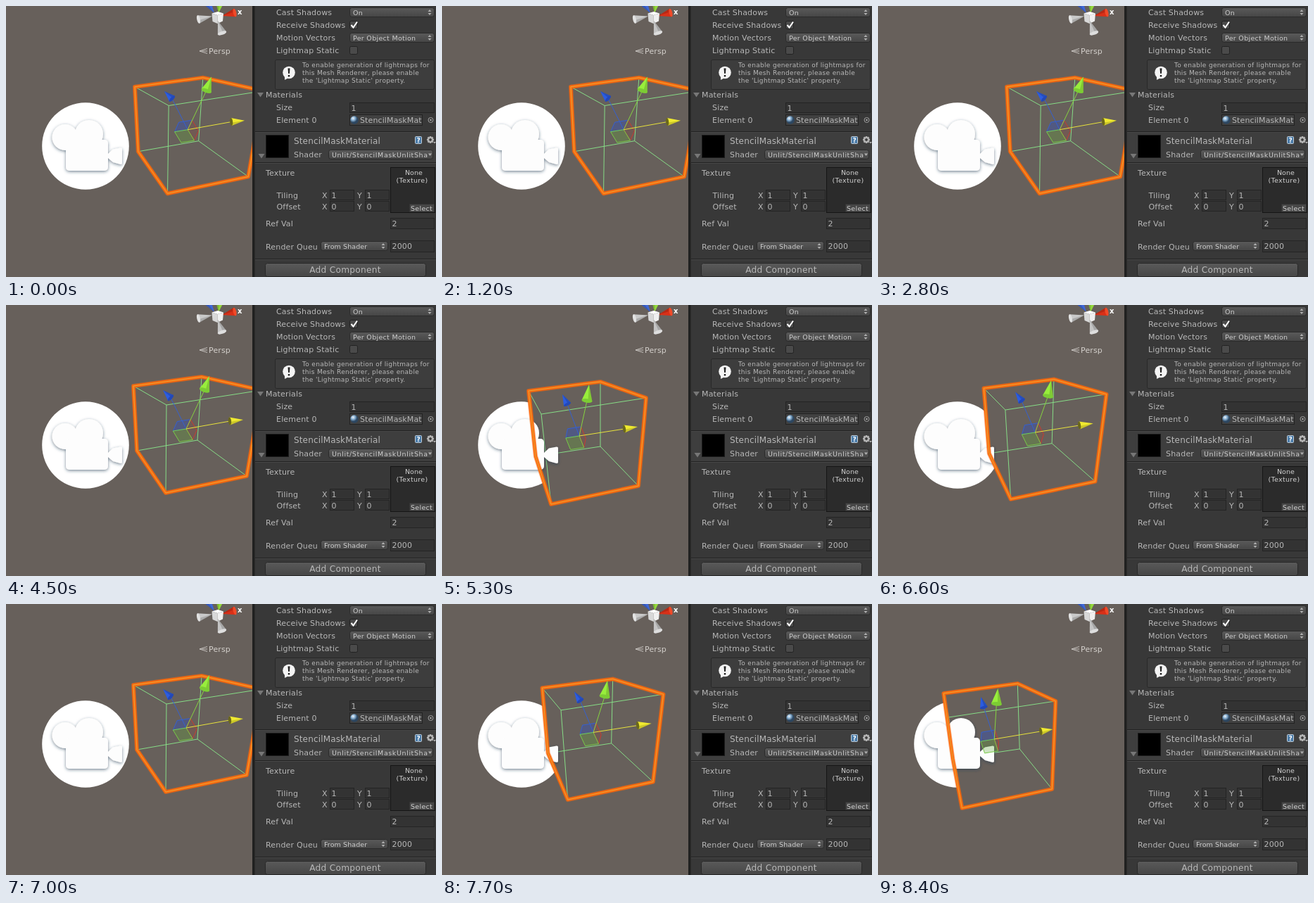
Recreate the animation shown at these times as an HTML page. Size 611 by 385 pixels, loop 9.6 s.

```html
<!DOCTYPE html>
<html lang="en">
<head>
<meta charset="utf-8">
<title>Stencil mask</title>
<style>
html, body { margin: 0; width: 100%; height: 100%; overflow: hidden; background: #67605b; }
svg { display: block; width: 611px; height: 385px; }
text { font-family: "DejaVu Sans", sans-serif; white-space: pre; }
</style>
</head>
<body>
<svg viewBox="0 0 611 385" xmlns="http://www.w3.org/2000/svg">
  <defs>
    <clipPath id="view"><path d="M0 0H350V385H0Z"/></clipPath>
    <clipPath id="slot"><path d="M488 154H591V171H488Z"/></clipPath>
    <linearGradient id="btn" x2="0" y2="1"><stop stop-color="#5a5a5a"/><stop offset="1" stop-color="#464646"/></linearGradient>
    <radialGradient id="ball" cx=".35" cy=".3"><stop stop-color="#f0f6fb"/><stop offset=".5" stop-color="#86aed0"/><stop offset="1" stop-color="#2c4660"/></radialGradient>
    <filter id="soft" x="-20%" y="-20%" width="140%" height="140%"><feDropShadow dx="0" dy="1.5" stdDeviation="2" flood-color="#243850" flood-opacity=".6"/></filter>
  </defs>
  <rect width="350" height="385" fill="#67605b"/>
  <g clip-path="url(#view)">
    <circle cx="113" cy="199" r="61.8" fill="#fff"/>
    <path id="mask" fill="#67605b"/>
    <path id="wires" fill="none" stroke="#86dc86"/>
    <g filter="url(#soft)" fill="#fdfdfd">
      <circle cx="84" cy="186.500" r="18.500"/>
      <circle cx="118" cy="182" r="20"/>
      <rect x="85" y="190" width="60" height="44" rx="5"/>
      <path d="M144 211L152 203.500L163 201.500Q165 201.500 165 203V223Q165 225 163 225L152 222L144 215Z"/>
    </g>
    <g fill="none" stroke-linejoin="round">
      <path id="halo" stroke="#f2660c" stroke-opacity=".55" stroke-width="6.200"/>
      <path id="glow" stroke="#ff6a0c" stroke-width="4.200"/>
      <path id="edge" stroke="#c8d860" stroke-opacity=".6" stroke-width=".9"/>
    </g>
    <g id="handles"></g>
    <g id="compass"></g>
  </g>
  <g id="panel"></g>
</svg>
<script>
const $ = id => document.getElementById(id);

// Each point: x, y in three poses, taken where the cube's left corner is at LEAD.
const LEAD = [181, 123, 93];
const POINTS = {
  a: [181, 115, 123, 122, 93, 127],
  b: [278, 102, 225, 109, 198, 113],
  c: [363, 121, 290, 132, 252, 138],
  d: [228, 142, 141, 155, 100, 161],
  e: [342, 243, 279, 257, 247, 263],
  f: [227, 267, 155, 283, 119, 290],
  g: [272, 192, 225, 201, 201, 206],
  h: [186, 207, 133, 215, 106, 220],
  o: [256, 176, 195, 186, 165, 192],
  xTip: [337, 163, 278, 173, 248, 178],
  xBase: [318, 165, 259, 176, 231, 181],
  yTip: [289, 101, 209, 113, 170, 120],
  yBase: [282, 121, 206, 136, 168, 142],
  zTip: [223, 121, 171, 127, 146, 132],
  zBase: [234, 132, 178, 141, 150, 147]
};

function pose(x) {
  const w = LEAD.map((p, i) => LEAD.reduce((m, q, j) => i === j ? m : m * (x - q) / (p - q), 1));
  const out = {};
  for (const k in POINTS) {
    const p = POINTS[k];
    out[k] = [0, 1].map(c => w[0] * p[c] + w[1] * p[c + 2] + w[2] * p[c + 4]);
  }
  return out;
}

const PUSH = [[4400, 183], [4500, 181], [4700, 170.5], [5300, 123], [5400, 113], [5500, 105.5], [5600, 99.5], [5700, 95], [5800, 92.5]];
const ease = (t, t0, t1, from, to) => {
  const u = Math.min(1, Math.max(0, (t - t0) / (t1 - t0)));
  return from + (to - from) * (1 - Math.cos(Math.PI * u)) / 2;
};

function lead(t) {
  if (t < 4400) return 183;
  if (t < 5800) {
    const i = PUSH.findIndex(k => k[0] > t);
    const [t0, x0] = PUSH[i - 1], [t1, x1] = PUSH[i];
    return x0 + (x1 - x0) * (t - t0) / (t1 - t0);
  }
  return t < 7100 ? ease(t, 6000, 7000, 92.5, 181) : ease(t, 7100, 8400, 181, 93.3);
}

const path = (...pts) => "M" + pts.map(p => p.map(v => v.toFixed(2)).join(" ")).join("L");

function cone(base, tip, r, fill, disc) {
  const dx = tip[0] - base[0], dy = tip[1] - base[1];
  const len = Math.hypot(dx, dy), turn = Math.atan2(dy, dx) * 180 / Math.PI;
  return `<g transform="translate(${base}) rotate(${turn})"><path d="M0 ${-r}L${len} 0L0 ${r}Z" fill="${fill}"/>` +
    `<path d="M0 ${r * .2}L${len} 0L0 ${r}Z" fill="#000" opacity=".15"/>` +
    `<ellipse rx="${r * .38}" ry="${r}" fill="${disc}"/></g>`;
}

function handles(p) {
  const off = (tip, k) => [0, 1].map(i => (tip[i] - p.o[i]) * k);
  const add = (...v) => [0, 1].map(i => v.reduce((s, q) => s + q[i], 0));
  const x = off(p.xTip, -.23), y = off(p.yTip, .18), z = off(p.zTip, -.28);
  const quad = (u, v, stroke, fill) =>
    `<path d="${path(p.o, add(p.o, u), add(p.o, u, v), add(p.o, v))}Z" stroke="${stroke}" fill="${fill}"/>`;
  const axis = (end, color) => `<path d="${path(p.o, end)}" stroke="${color}"/>`;
  return quad(x, y, "#3560d0", "rgba(50,80,190,.4)") +
    quad(y, z, "#cc3a30", "rgba(190,50,40,.12)") +
    quad(x, z, "#78cc48", "rgba(100,170,60,.3)") +
    axis(p.zBase, "#3560d0") + axis(p.yBase, "#86d440") + axis(p.xBase, "#e8e23c") +
    cone(p.zBase, p.zTip, 5.5, "#2c5ce0", "#2348b8") +
    cone(p.yBase, p.yTip, 7.5, "#98ee3c", "#7ccc34") +
    cone(p.xBase, p.xTip, 5.5, "#f0ea30", "#6b681c");
}

function draw(t) {
  const p = pose(lead(t)), { a, b, c, d, e, f, g, h } = p;
  const hull = path(a, b, c, e, f, h) + "Z";
  for (const id of ["mask", "halo", "glow", "edge"]) $(id).setAttribute("d", hull);
  $("wires").setAttribute("d", path(a, d, c) + path(d, f) + path(b, g, h) + path(g, e));
  $("handles").innerHTML = handles(p);
}

// Inspector panel
const text = (x, y, s, size = 11, gap = .18, more = "") =>
  `<text x="${x}" y="${y}" font-size="${size}" letter-spacing="${gap}" fill="#b8b8b8" ${more}>${s}</text>`;
const small = (x, y, s, gap = .3) => text(x, y, s, 9.5, gap, 'style="fill:#d0d0d0"');
const box = (x, y, w, h, fill, stroke = "#222", rx = 0) =>
  `<rect x="${x + .5}" y="${y + .5}" width="${w - 1}" height="${h - 1}" rx="${rx}" fill="${fill}" stroke="${stroke}"/>`;
const shape = (d, fill) => `<path d="${d}" fill="${fill}"/>`;
const field = (x, y, w, h, s) => box(x, y, w, h, "#333", "#242424") + text(x + 2.5, y + 12, s);
const popup = (x, y, w, s, gap) => box(x, y, w, 14, "url(#btn)", "#2a2a2a", 3) + small(x + 5, y + 10.5, s, gap);
const updown = (x, y) => shape(`M${x - 2.5} ${y - 1}h5l-2.5 -3zM${x - 2.5} ${y + 1}h5l-2.5 3z`, "#b0b0b0");
const check = y => box(488, y, 12, 12, "#4a4a4a", "#222", 2);
const fold = (x, y) => shape(`M${x - 4.5} ${y - 3}h9l-4.5 6.500z`, "#777");
const rule = y => shape(`M354 ${y}H611v1H354z`, "#222") + shape(`M354 ${y + 1}H611v1H354z`, "#484848");

function panel() {
  let gear = "";
  for (let i = 0; i < 8; i++) gear += `<rect x="601.800" y="185" width="2.400" height="3" transform="rotate(${i * 45} 603 190)" fill="#b4b4b4"/>`;
  return [
    shape("M350 0H611V385H350Z", "#383838"),
    shape("M350 0h3.500V385h-3.500z", "#202020"),
    text(384, 13, "Cast Shadows"), popup(488, 2, 121, "On"), updown(602, 9),
    text(384, 31, "Receive Shadows"), check(21),
    '<path d="M490.500 27L493.500 30.500L499 22.500" fill="none" stroke="#fff" stroke-width="2"/>',
    text(384, 49, "Motion Vectors"), popup(488, 38, 121, "Per Object Motion"), updown(602, 45),
    text(384, 67, "Lightmap Static"), check(57),
    box(382, 76, 227, 43, "#3d3d3d", "#282828", 2),
    '<circle cx="402" cy="94.500" r="8.800" fill="#f4f4f4"/>',
    shape("M396 99L396 105L402 102Z", "#f4f4f4"),
    shape("M400.500 88.500h3l-.6 7.500h-1.800zM400.800 98h2.400v2.400h-2.400z", "#222"),
    ["To enable generation of lightmaps for", "this Mesh Renderer, please enable", "the 'Lightmap Static' property."]
      .map((s, i) => text(421, 87 + i * 11, s, 9, .32)).join(""),
    fold(361.5, 126), text(369, 130, "Materials"),
    text(384, 148, "Size"), field(488, 137, 121, 15, "1"),
    text(384, 166, "Element 0"), box(488, 154, 104, 16, "#414141"),
    '<circle cx="495" cy="162" r="5.800" fill="url(#ball)"/>',
    text(503, 166, "StencilMaskMat", 11, .12, 'clip-path="url(#slot)"'),
    '<circle cx="603.500" cy="162" r="3.500" fill="none" stroke="#a0a0a0"/><circle cx="603.500" cy="162" r="1.200" fill="#b0b0b0"/>',
    shape("M354 179H611V222H354Z", "#3e3e3e"), rule(178), rule(222),
    box(369, 183, 33, 33, "#000", "#1c1c1c"),
    text(409, 196, "StencilMaskMaterial", 12, .15),
    box(581, 185, 10, 11, "#4a7ba8", "#c4d0da", 1), text(583.5, 194, "?", 9, 0, 'font-weight="bold" style="fill:#fff"'),
    gear, '<circle cx="603" cy="190" r="3" fill="none" stroke="#b4b4b4" stroke-width="2"/>',
    shape("M607 193h4l-2 2.500z", "#b4b4b4"),
    fold(363, 213), text(409, 215, "Shader"), popup(458, 204, 149, "Unlit/StencilMaskUnlitSha", .6),
    shape("M600 209.500h5l-2.500 3.500z", "#b0b0b0"),
    text(369, 241, "Texture"), box(546, 229, 64, 65, "#2b2b2b", "#151515"),
    small(567, 240, "None", 0), small(554.5, 251, "(Texture)"),
    box(573, 281, 36, 12, "#474747", "#333"), small(575, 290.5, "Select"),
    [["Tiling", "1", 261], ["Offset", "0", 277]].map(([s, v, y]) =>
      text(384.5, y + 12, s) + text(449, y + 12, "X") + field(460, y, 35, 15, v) +
      text(499, y + 12, "Y") + field(510, y, 35, 15, v)).join(""),
    text(369, 313, "Ref Val"), field(546, 301, 63, 16, "2"),
    text(369, 346, "Render Queu"), popup(447, 334, 96, "From Shader", .1), updown(536, 341),
    field(546, 333, 63, 17, "2000"),
    rule(359), box(368, 365, 229, 20, "url(#btn)", "#282828", 3),
    text(482, 379, "Add Component", 12.2, .25, 'text-anchor="middle"')
  ].join("");
}

function compass() {
  return cone([288, -2], [296, 10], 4.5, "#3f68d8", "#3055b8") +
    cone([304, -7], [302, 10], 6.5, "#93d83c", "#7cba34") +
    cone([273.5, 19], [293, 14.5], 6, "#c9c9c9", "#e2e2e2") +
    cone([325, 9.5], [307, 14], 6, "#d83018", "#f04a28") +
    shape("M292.500 10.500L301 8L309 10.500L300.500 13Z", "#fff") +
    shape("M292.500 10.500L300.500 13V25L293.500 22Z", "#d8d8d8") +
    shape("M300.500 13L309 10.500L308 21.500L300.500 25Z", "#f0f0f0") +
    cone([307, 38.5], [301, 21], 6.5, "#c4c4c4", "#dedede") +
    text(329, 12, "x", 10, 0, 'font-weight="bold" style="fill:#fff"') +
    '<path d="M286 60.500L275 64L286 67.500M275 64H286" fill="none" stroke="#c4c0bc"/>' +
    text(288, 68, "Persp", 11, .15, 'style="fill:#d4d0cc"');
}

$("panel").innerHTML = panel();
$("compass").innerHTML = compass();

const LOOP = 9600, STEP = 100, start = performance.now();
function tick() {
  const t = (performance.now() - start) % LOOP;
  draw(Math.floor(t / STEP) * STEP);
  requestAnimationFrame(tick);
}
tick();
</script>
</body>
</html>
```
